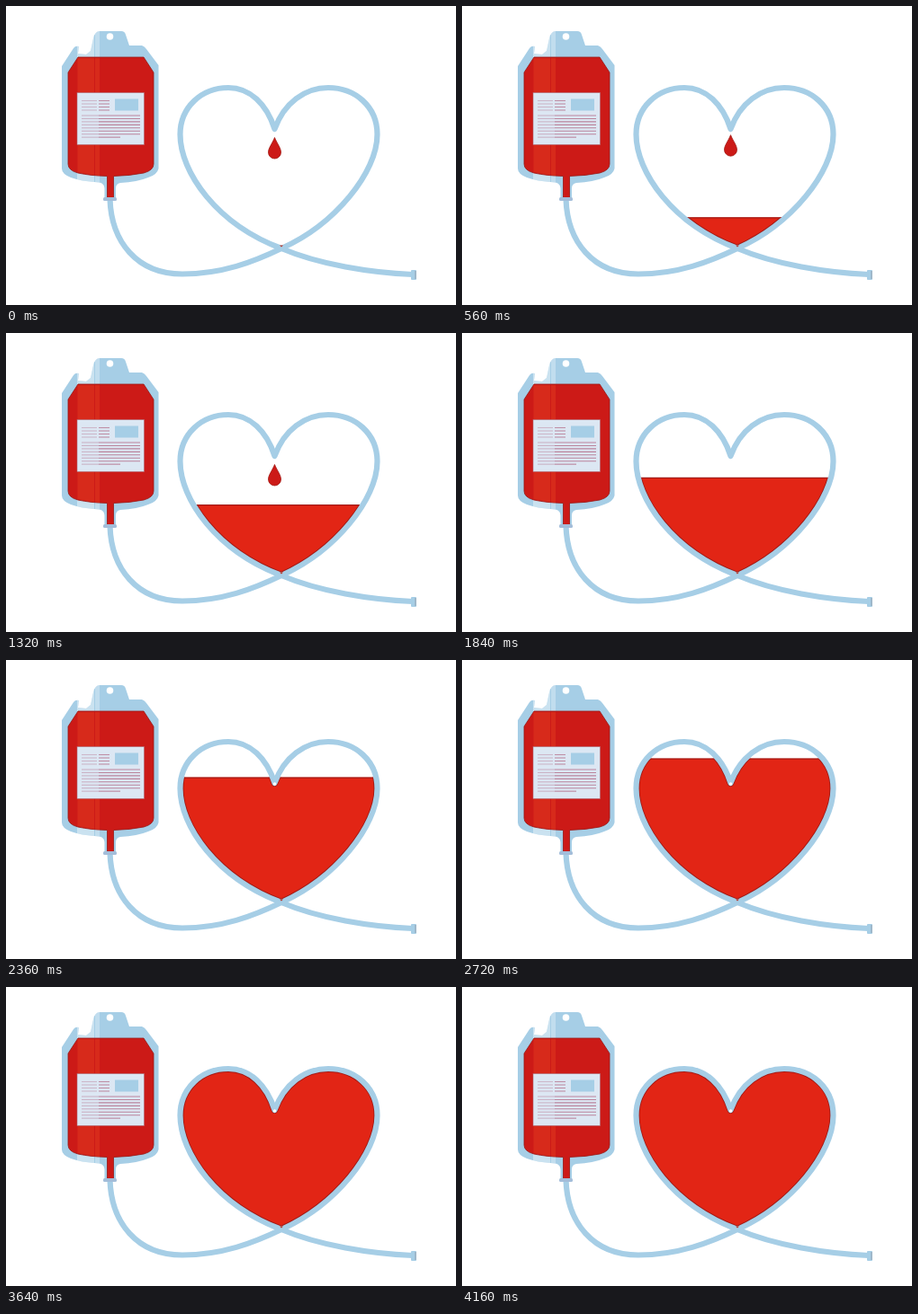
An HTML page for the animation above (4200 ms loop, 500 px wide and 333 px high).

```html
<!DOCTYPE html>
<html lang="en">
<head>
<meta charset="utf-8">
<title>Blood donation</title>
<style>
html, body { margin: 0; width: 100%; height: 100%; overflow: hidden; background: #fff; }
svg { display: block; width: 100vw; height: 100vh; }
</style>
</head>
<body>
<svg viewBox="0 0 500 333">
  <defs>
    <path id="heart" d="M306 270C366 243 412.5 185 412.5 143C412.5 112 388 91 358 91C332 91 309 108 298.5 137C289.500 109 271 91 247 91C217 91 193.5 113 193.5 143C193.5 185 234 243 306 270Z"/>
    <path id="body" d="M62 67L75 47Q77 44 81 45L80 53L89 54L94 50L97 36Q99 28 104 28H128Q132 28 133 32L137 44H151Q154 45 156 48L169.500 66V181Q168 188 158 191Q146 196 127 197Q122 198 122 203V214H109.500V203Q109 197 103 196.500Q82 195 72 191Q62 187 62 181Z"/>
    <clipPath id="inHeart"><use href="#heart"/></clipPath>
    <clipPath id="inBody"><use href="#body"/></clipPath>
    <clipPath id="filled"><rect id="level" x="180" width="250" height="200"/></clipPath>
  </defs>

  <!-- blood inside the heart -->
  <g clip-path="url(#inHeart)">
    <g clip-path="url(#filled)">
      <use href="#heart" fill="#e22515" stroke="#a31a15" stroke-width="8" stroke-linejoin="round"/>
    </g>
    <path id="surface" d="M180 .5H430" stroke="#a31a15" stroke-width="1.200"/>
  </g>

  <!-- tube -->
  <g fill="none" stroke="#a6cee6" stroke-width="6.200" stroke-linejoin="round">
    <path d="M115.500 215C117 262 145 298.500 196 298.500C240 298.500 275 285 306 270C348 288 405 297 452 299"/>
    <use href="#heart"/>
  </g>
  <path d="M304 266.500H308L306 268.500Z" fill="#b5372c"/>
  <rect x="450" y="294" width="6" height="11" rx="1" fill="#a6cee6"/>
  <path d="M455 295V304" stroke="#9aa9b8" stroke-width="1.200"/>
  <circle id="tip" cx="298.500" cy="138" r="1.800" fill="#fff"/>

  <!-- drop -->
  <path id="drop" d="M298.500 .5C301 7 305.500 12 305.500 17A7 7 0 0 1 291.500 17C291.500 12 296 7 298.500 .5Z" fill="#cc1a17" stroke="#a31a15" stroke-width=".8"/>

  <!-- bag -->
  <use href="#body" fill="#a6cee6"/>
  <g clip-path="url(#inBody)" fill="#fff">
    <path d="M79 28H98V200H79Z" opacity=".4"/>
    <path d="M99 28H104V200H99Z" opacity=".3"/>
  </g>
  <circle cx="115.500" cy="34" r="3.800" fill="#fff"/>
  <path d="M80 57H153L164 74V176Q164 183 153 186Q138 189 119.500 189.500V214H112.500V189.500Q94 189 80 186Q69 183 69 176V74Z" fill="#cc1a17" stroke="#981816" stroke-width=".8"/>
  <path d="M79.500 58H98V188.500L79.500 185ZM99 58H104V189L99 188.500Z" fill="#e33a20" opacity=".5"/>
  <rect x="108" y="213" width="15" height="4" rx="1.500" fill="#a3bdd9"/>

  <!-- label -->
  <rect x="79" y="96.500" width="74.500" height="58" fill="#dce7f3" stroke="#b0606a" stroke-width=".6"/>
  <rect x="121" y="103.500" width="26" height="13" fill="#a6cee6"/>
  <g id="lines" stroke="#b97f98" stroke-width="1.100"></g>
</svg>
<script>
const LOOP = 4200, STEP = 40;
const $ = id => document.getElementById(id);

function line(x1, x2, y, opacity) {
  return `<path d="M${x1} ${y}H${x2}" opacity="${opacity}"/>`;
}

let rows = '';
for (let i = 0; i < 4; i++) {
  const y = 105.5 + i * 3.5;
  rows += line(84, 101, y, .45) + line(103, 115, y, .85);
}
for (let i = 0; i < 8; i++) {
  const y = 122 + i * 3.45, end = i < 7 ? 149 : 127;
  rows += line(84, 103, y, .5) + line(103, end, y, .95);
}
$('lines').innerHTML = rows;

function draw(now) {
  const t = Math.floor(now % LOOP / STEP) * STEP;
  const level = Math.max(84, 268 - t * .0582);
  const dropY = 144.5 + 1.5 * Math.cos(2 * Math.PI * t / 1300);

  $('level').setAttribute('y', level);
  $('surface').setAttribute('transform', `translate(0 ${level})`);
  $('drop').setAttribute('transform', `translate(0 ${dropY})`);
  // the drop vanishes once the blood reaches it
  $('drop').style.display = level > dropY + 24 ? '' : 'none';
  $('tip').style.display = level < 138 ? '' : 'none';
  requestAnimationFrame(draw);
}
draw(0);
</script>
</body>
</html>
```
